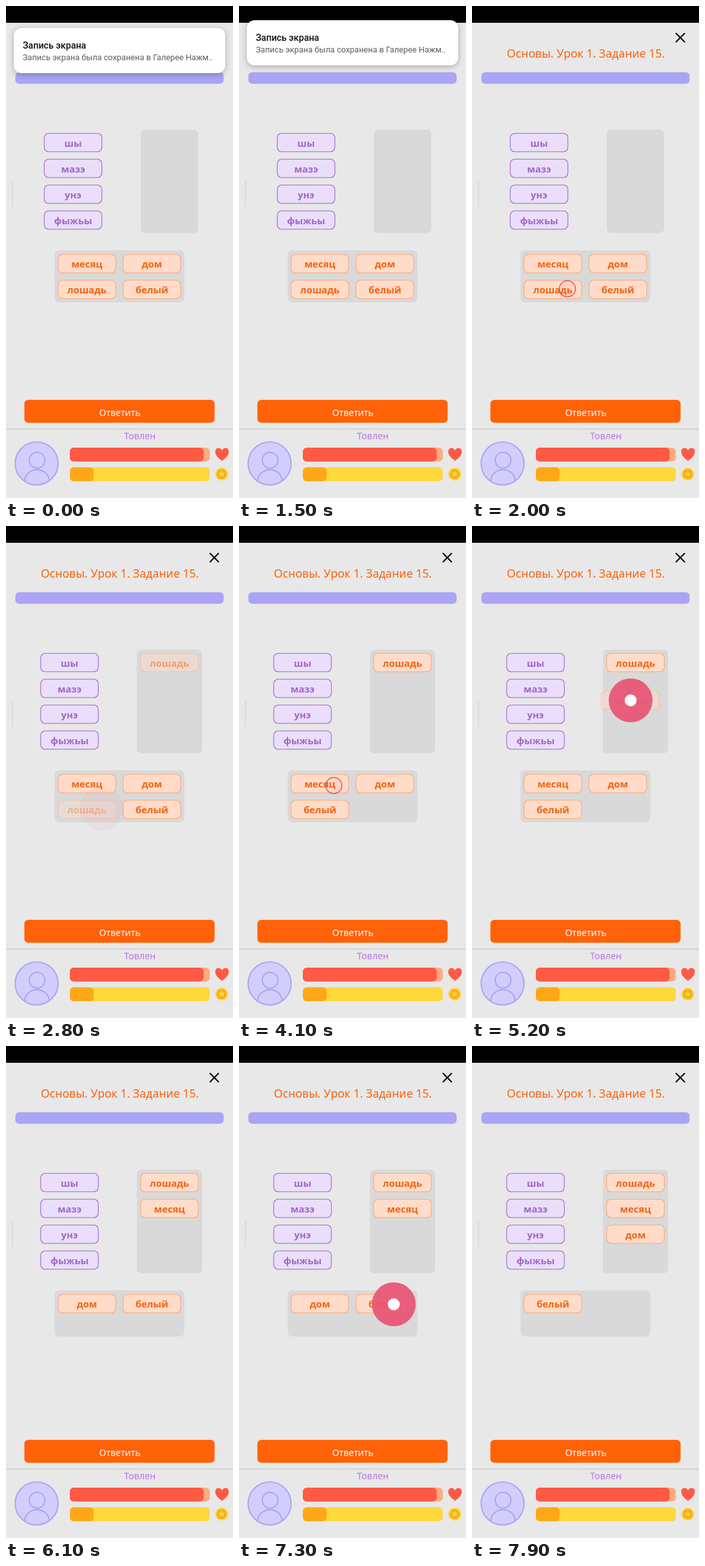
Write an HTML page with a canvas that moves like this. It is 352 by 762 pixels and loops after 8000 ms.

```html
<!DOCTYPE html>
<html lang="ru">
<head>
<meta charset="utf-8">
<title>Урок</title>
<style>
html, body { margin: 0; width: 100%; height: 100%; overflow: hidden; background: #e8e8e8; }
canvas { display: block; width: 352px; height: 762px; }
</style>
</head>
<body>
<canvas id="stage"></canvas>
<script>
const W = 352, H = 762, LOOP = 8000, STEP = 100;
const SANS = '"Noto Sans", "Open Sans", sans-serif';
const ROBOTO = 'Roboto, sans-serif';
const canvas = document.getElementById('stage');
const ctx = canvas.getContext('2d');
const dpr = window.devicePixelRatio || 1;
canvas.width = W * dpr;
canvas.height = H * dpr;

const ORANGE = { fill: '#ffdcc9', line: '#ffa877', text: '#f5620f' };
const PURPLE = { fill: '#eadefa', line: '#a168d0', text: '#a067c6' };
const PROMPTS = ['шы', 'мазэ', 'унэ', 'фыжьы'];
const ANSWERS = ['месяц', 'дом', 'лошадь', 'белый'];

// Each move: touch at `start`, let go at `drop`; the optional drag runs over `drag`.
const MOVES = [
  { word: 'лошадь', start: 2000, grow: 500, drop: 2700, from: [148, 438] },
  { word: 'месяц', start: 4100, grow: 600, drop: 5700, from: [147, 402], to: [246, 270], drag: [4700, 5200] },
  { word: 'дом', start: 7000, grow: 300, drop: 7400, from: [240, 400] }
];
const FADE = 200;

const clamp = v => Math.max(0, Math.min(1, v));
const span = (t, a, b) => clamp((t - a) / (b - a));
const mix = (a, b, k) => a + (b - a) * k;
const smooth = k => k * k * (3 - 2 * k);

function box(x, y, w, h, r, fill, line) {
  ctx.beginPath();
  ctx.roundRect(x, y, w, h, r);
  ctx.fillStyle = fill;
  ctx.fill();
  if (line) {
    ctx.strokeStyle = line;
    ctx.lineWidth = 1.1;
    ctx.stroke();
  }
}

function text(str, x, y, font, color, align = 'center') {
  ctx.font = font;
  ctx.fillStyle = color;
  ctx.textAlign = align;
  ctx.fillText(str, x, y);
}

function circle(x, y, r, fill, line, width) {
  ctx.beginPath();
  ctx.arc(x, y, r, 0, Math.PI * 2);
  if (fill) { ctx.fillStyle = fill; ctx.fill(); }
  if (line) { ctx.strokeStyle = line; ctx.lineWidth = width; ctx.stroke(); }
}

function faded(alpha, draw) {
  if (alpha <= 0) return;
  ctx.save();
  ctx.globalAlpha *= alpha;
  draw();
  ctx.restore();
}

function chip(word, cx, cy, look) {
  box(cx - 44.7, cy - 14.3, 89.4, 28.6, 7, look.fill, look.line);
  text(word, cx, cy + 6, `700 14.8px ${SANS}`, look.text);
}

function header() {
  ctx.fillStyle = '#000';
  ctx.fillRect(0, 0, W, 26);
  ctx.strokeStyle = '#000';
  ctx.lineWidth = 2;
  ctx.beginPath();
  ctx.moveTo(316, 42); ctx.lineTo(330, 56);
  ctx.moveTo(330, 42); ctx.lineTo(316, 56);
  ctx.stroke();
  text('Основы. Урок 1. Задание 15.', 176.5, 80, `500 17.6px ${SANS}`, '#ff6208');
  box(14.5, 102.5, 323, 18, 6, '#aaa5f3');
  ctx.fillStyle = 'rgba(0,0,0,.05)';
  ctx.fillRect(9, 270, 2, 41);
}

function heart(x, y) {
  ctx.beginPath();
  ctx.moveTo(x, y + 10);
  ctx.bezierCurveTo(x - 5, y + 6, x - 10.5, y + 2, x - 10.5, y - 4);
  ctx.bezierCurveTo(x - 10.5, y - 11, x - 2.5, y - 12, x, y - 6);
  ctx.bezierCurveTo(x + 2.5, y - 12, x + 10.5, y - 11, x + 10.5, y - 4);
  ctx.bezierCurveTo(x + 10.5, y + 2, x + 5, y + 6, x, y + 10);
  ctx.fillStyle = '#ff5a43';
  ctx.fill();
}

function coin(x, y) {
  circle(x, y, 10, '#ffd43a');
  circle(x, y, 7.6, '#f9a91c');
  ctx.beginPath();
  for (let i = 0; i < 10; i++) {
    const r = i % 2 ? 2.8 : 5.8, a = i * Math.PI / 5 - Math.PI / 2;
    ctx.lineTo(x + r * Math.cos(a), y + r * Math.sin(a));
  }
  ctx.closePath();
  ctx.fillStyle = '#ffd83b';
  ctx.fill();
}

function avatar(x, y) {
  circle(x, y, 33.3, '#d2cefb');
  ctx.strokeStyle = '#aaa5f3';
  ctx.lineWidth = 2;
  ctx.beginPath();
  ctx.moveTo(x - 18.5, y + 27);
  ctx.bezierCurveTo(x - 17, y + 4, x + 18, y + 4, x + 19.5, y + 27);
  ctx.stroke();
  circle(x + 0.7, y - 5, 12.2, '#d2cefb', '#aaa5f3', 2);
  circle(x, y, 33.3, null, '#aaa5f3', 2);
}

function footer() {
  box(28.5, 610, 295, 35.5, 6, '#ff6208');
  text('Ответить', 176.5, 634.5, `500 14px ${SANS}`, '#fff');
  ctx.fillStyle = '#cdcdcd';
  ctx.fillRect(0, 654.5, W, 1.5);
  text('Товлен', 207.5, 671, `400 14.2px ${SANS}`, '#b576e2');
  avatar(47.5, 708.5);
  box(99, 684, 217, 21.5, 6, '#ffab82');
  box(99, 684, 207.5, 21.5, 6, '#ff5a43');
  box(99, 714.5, 217, 21.5, 6, '#ffd83b');
  box(99, 714.5, 37, 21.5, 6, '#ffa817');
  heart(335, 694.5);
  coin(334.5, 725);
}

function prompts(t) {
  const placed = t >= MOVES[0].drop;
  const x = placed ? 98.5 : 104;
  PROMPTS.forEach((word, i) => chip(word, x, 211.5 + 40 * i, PURPLE));
  if (placed) box(203, 191.5, 101, 160.5, 7, '#d9d9d9');
  else box(209, 191.5, 89, 160, 7, '#d9d9d9');
  MOVES.forEach((m, i) => faded(span(t, m.drop, m.drop + FADE),
    () => chip(m.word, 253.5, 211.5 + 40 * i, ORANGE)));
}

function tray(t) {
  const moveOf = word => MOVES.find(m => m.word === word);
  const left = ANSWERS.filter(word => {
    const m = moveOf(word);
    return !m || t < m.drop + FADE;
  });
  box(75.5, 378.5, 201, left.length > 2 ? 80.5 : 71.5, 7, '#d9d9d9');
  left.forEach((word, i) => {
    const m = moveOf(word);
    const k = m ? span(t, m.drop, m.drop + FADE) : 0;
    faded(Math.pow(1 - k, 1.5), () =>
      chip(word, 125.5 + 100.7 * (i % 2), 399 + 40 * Math.floor(i / 2), ORANGE));
  });
}

function touch(t, m) {
  if (t < m.start || t >= m.drop + FADE) return;
  const p = smooth(span(t, m.start, m.start + m.grow));
  const away = span(t, m.drop, m.drop + FADE);
  let [x, y] = m.from;
  if (m.drag) {
    const k = smooth(span(t, ...m.drag));
    x = mix(x, m.to[0], k);
    y = mix(y, m.to[1], k);
    if (k > 0) faded(0.5 * (1 - away), () => chip(m.word, x - 0.7, y, ORANGE));
  }
  faded(Math.pow(1 - away, 4), () => {
    const r = mix(12.5, 34, p);
    circle(x, y, r, `rgba(233,84,118,${mix(0.06, 0.92, p)})`);
    if (p < 1) circle(x, y, r, null, `rgba(214,62,96,${0.85 * (1 - p)})`, 1.5);
    if (p > 0) circle(x, y, 9.3 * p, '#fff');
  });
}

function notice(t) {
  if (t >= 1700) return;
  const k = Math.max(0, (t - 1400) / 100);
  ctx.save();
  ctx.translate(0, -12 * k * k);
  ctx.shadowColor = 'rgba(0,0,0,.28)';
  ctx.shadowBlur = 9 * dpr;
  ctx.shadowOffsetY = 2 * dpr;
  box(12, 34, 328, 70, 12, '#fff');
  ctx.shadowColor = 'transparent';
  text('Запись экрана', 26, 66, `500 14.2px ${ROBOTO}`, '#111', 'left');
  text('Запись экрана была сохранена в Галерее Нажм..', 26, 84, `400 12.75px ${ROBOTO}`, '#5c5c5c', 'left');
  ctx.restore();
}

function frame(now) {
  const t = Math.floor((now % LOOP) / STEP) * STEP;
  ctx.setTransform(dpr, 0, 0, dpr, 0, 0);
  ctx.fillStyle = '#e8e8e8';
  ctx.fillRect(0, 0, W, H);
  header();
  prompts(t);
  tray(t);
  footer();
  MOVES.forEach(m => touch(t, m));
  notice(t);
}

let begin;
function tick(now) {
  begin ??= now;
  frame(now - begin);
  requestAnimationFrame(tick);
}
frame(0);
requestAnimationFrame(tick);
</script>
</body>
</html>
```
